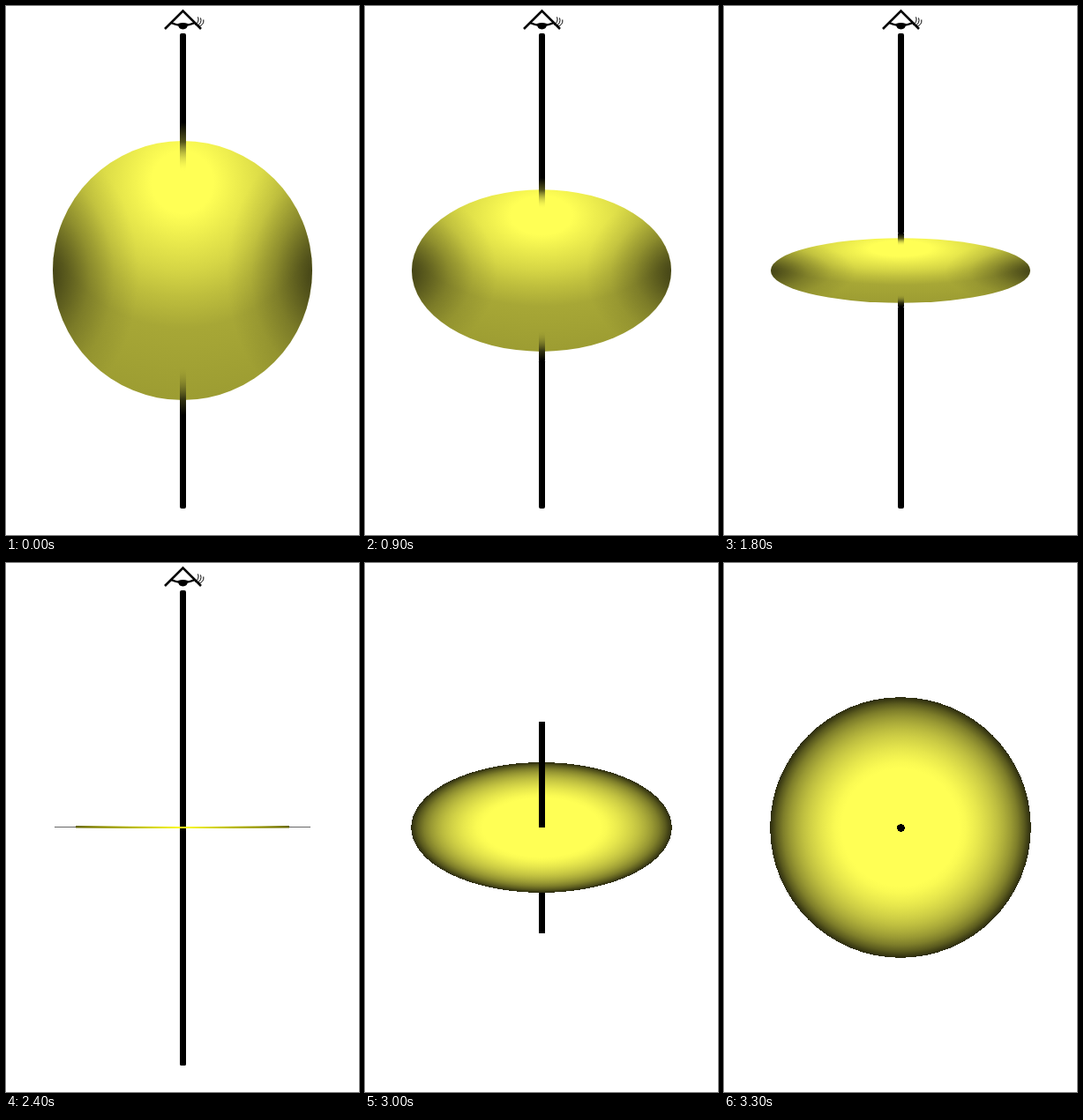
Animation of 400x600 px, one loop 3750 ms. Source, as an HTML page:

```html
<!DOCTYPE html>
<html lang="en">
<head>
<meta charset="utf-8">
<title>Flattening sphere</title>
<style>
html, body { margin: 0; width: 100%; height: 100%; overflow: hidden; background: #fff; }
svg { display: block; width: 400px; height: 600px; }
</style>
</head>
<body>
<svg viewBox="0 0 400 600">
  <defs>
    <radialGradient id="lit" gradientUnits="userSpaceOnUse" cx="0" cy="-100" r="250">
      <stop offset=".14" stop-color="#ffff55"/>
      <stop offset=".28" stop-color="#e8e84c"/>
      <stop offset=".4" stop-color="#d5d545"/>
      <stop offset=".52" stop-color="#bebe3d"/>
      <stop offset=".66" stop-color="#a7a736"/>
      <stop offset="1" stop-color="#9c9c32"/>
    </radialGradient>
    <radialGradient id="shade">
      <stop offset=".1" stop-color="#000" stop-opacity=".6"/>
      <stop offset=".5" stop-color="#000" stop-opacity=".24"/>
      <stop offset=".75" stop-color="#000" stop-opacity=".08"/>
      <stop offset="1" stop-color="#000" stop-opacity="0"/>
    </radialGradient>
    <linearGradient id="enter" x1="0" y1="0" x2="0" y2="1">
      <stop offset="0" stop-color="#000"/>
      <stop offset=".4" stop-color="#55551b"/>
      <stop offset="1" stop-color="#ffff55" stop-opacity="0"/>
    </linearGradient>
    <linearGradient id="leave" x1="0" y1="1" x2="0" y2="0">
      <stop offset="0" stop-color="#000"/>
      <stop offset=".32" stop-color="#333311"/>
      <stop offset="1" stop-color="#a5a535" stop-opacity="0"/>
    </linearGradient>
    <linearGradient id="rim">
      <stop offset="0" stop-color="#666600"/>
      <stop offset=".25" stop-color="#b4b400"/>
      <stop offset=".5" stop-color="#ffff1a"/>
      <stop offset=".75" stop-color="#b4b400"/>
      <stop offset="1" stop-color="#666600"/>
    </linearGradient>
    <radialGradient id="top"></radialGradient>
    <clipPath id="ball"><circle r="147" shape-rendering="crispEdges"/></clipPath>
  </defs>

  <g id="side">
    <g fill="none" stroke="#000">
      <path d="M180 26L200.500 5.500L221 26" stroke-width="2.600"/>
      <path d="M187 19Q193 22 200.500 22T214 19" stroke-width="2"/>
      <path d="M217.500 12.500q2 5-3 9M220.500 13.500q2 6-4 9M223.800 15.500q1 6-6 8" stroke-width="1"/>
    </g>
    <path d="M195 20Q200.500 18 206 20Q206 26.500 200.500 26.500T195 20Z"/>
    <rect id="upper" x="197" y="31" width="7" rx="2"/>
    <rect id="lower" x="197" width="7" rx="2"/>
    <g id="solid">
      <g clip-path="url(#ball)">
        <rect x="-148" y="-148" width="296" height="296" fill="url(#lit)"/>
        <ellipse cx="-160" cy="5" rx="110" ry="155" fill="url(#shade)"/>
        <ellipse cx="160" cy="5" rx="110" ry="155" fill="url(#shade)"/>
      </g>
      <rect x="-3" y="-168" width="7" height="56" fill="url(#enter)"/>
      <rect x="-3" y="108" width="7" height="56" fill="url(#leave)"/>
    </g>
    <g id="edge">
      <rect x="55" y="299" width="290" height="1" fill="#666"/>
      <path d="M79 298Q200 300 321 298V300.500Q200 301.500 79 300.500Z" fill="url(#rim)"/>
    </g>
  </g>

  <g id="tilt" shape-rendering="crispEdges">
    <rect id="back" x="197" y="300" width="7"/>
    <ellipse id="disc" cx="200" cy="300" rx="147.800" fill="url(#top)"/>
    <rect id="front" x="197" width="7"/>
    <circle id="tip" cx="200.500" cy="300.500" r="4.500"/>
  </g>
</svg>
<script>
const el = id => document.getElementById(id);
const set = (id, attrs) => {
  for (const name in attrs) el(id).setAttribute(name, attrs[name]);
};
const show = (id, on) => set(id, { display: on ? 'inline' : 'none' });

// Face-on shading follows the cosine of the surface angle
for (let i = 0; i <= 20; i++) {
  const r = i / 20;
  const light = Math.min(1, Math.max(.17, 1.13 * Math.sqrt(1 - r * r)));
  const stop = document.createElementNS('http://www.w3.org/2000/svg', 'stop');
  stop.setAttribute('offset', r);
  stop.setAttribute('stop-color', `rgb(${255 * light},${255 * light},${85 * light})`);
  el('top').append(stop);
}

function drawSide(step) {
  const scale = 1 - step / 8;
  const flat = step === 8;
  const start = 300 - 168 * scale;
  const end = 300 + 164 * scale;
  // Overlap the fades slightly so the rod has no seam or rounded gap
  set('upper', { height: start - 31 + 2 * scale });
  set('lower', { y: end - 2 * scale, height: 570 - end + 2 * scale });
  show('solid', !flat);
  show('edge', flat);
  if (flat) {
    set('upper', { height: 539 });
  } else {
    set('solid', { transform: `translate(200 300) scale(1 ${scale})` });
  }
}

function drawTilt(step) {
  const reach = 240 - 60 * step;
  set('disc', { ry: Math.max(1, 147.8 * step / 4) });
  set('back', { height: reach });
  set('front', { y: 300 - reach, height: reach });
  show('tip', step === 4);
}

function draw(time) {
  const t = time % 3750;
  const side = t < 2700;
  show('side', side);
  show('tilt', !side);
  if (side) drawSide(Math.floor(t / 300));
  else drawTilt(Math.min(4, Math.floor((t - 2700) / 150)));
}

const begin = performance.now();
function tick() {
  draw(performance.now() - begin);
  requestAnimationFrame(tick);
}
tick();
</script>
</body>
</html>
```
